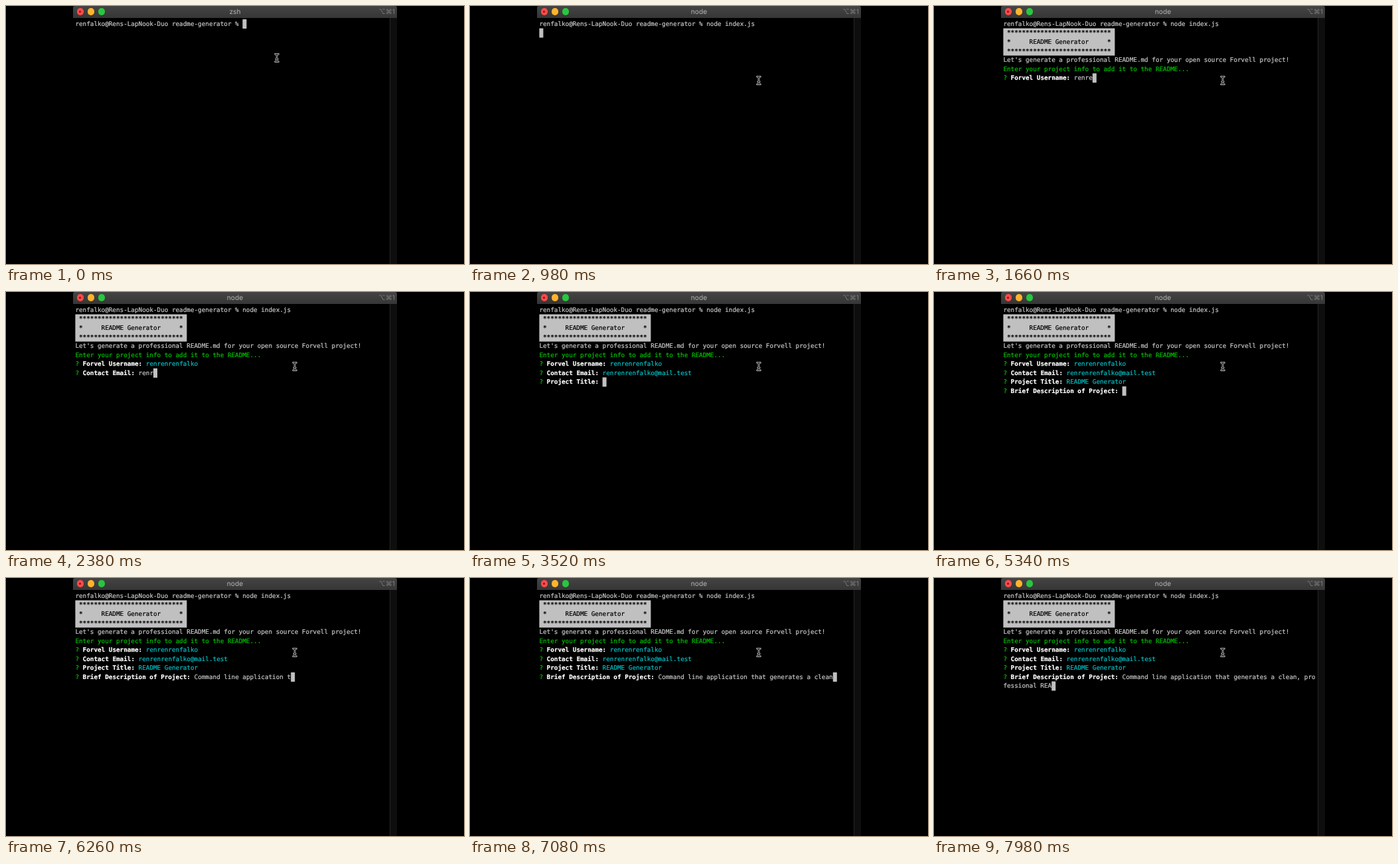
These frames come from a looping animation (690 px wide and 388 px high, 8 s). An HTML page:

```html
<!DOCTYPE html>
<html lang="en">
<head>
<meta charset="utf-8">
<title>Terminal session</title>
<style>
  html, body { margin: 0; width: 100%; height: 100%; overflow: hidden; background: #000; }
  #stage { position: relative; width: 690px; height: 388px; overflow: hidden; background: #000; text-rendering: geometricPrecision; }
  #stage > * { position: absolute; }
  #bar { left: 101px; top: 0; width: 488px; height: 17.5px; background: linear-gradient(#444, #363636); border-radius: 3px 3px 0 0; }
  #bar > * { position: absolute; }
  .light { top: 3.4px; width: 10.2px; height: 10.2px; border-radius: 50%; }
  .light i { position: absolute; left: 3.5px; top: 3.5px; width: 3.2px; height: 3.2px; border-radius: 50%; background: #7c1512; }
  #title { left: 0; width: 100%; top: 2px; text-align: center; font: 10.2px/14px Inter, sans-serif; color: #b4b4b4; }
  #keys { right: 3px; top: 2px; font: 10.2px/14px Inter, "DejaVu Sans", sans-serif; color: #7c7c7c; }
  #scroll { left: 578px; top: 17.5px; width: 10px; height: 371px; background: #0e0e0e; border-left: 1px solid #242424; }
  .row { left: 0; top: 0; height: 13.55px; white-space: pre; font: 9.3px/13.55px "DejaVu Sans Mono", monospace; color: #c7c7c7; -webkit-text-stroke: .22px currentColor; }
  .banner { color: #000; }
  .green { color: #00c200; }
  .cyan { color: #00bfc3; }
  b { color: #fff; }
  .block { left: 0; top: 0; background: #c0c0c0; }
  #panel { width: 168px; height: 40.6px; }
  #caret { width: 6px; height: 13.5px; }
  #mouse { left: 0; top: 0; overflow: visible; }
</style>
</head>
<body>
<div id="stage">
  <div id="bar">
    <div class="light" style="left:5.5px;background:#fc4b48"><i></i></div>
    <div class="light" style="left:21.5px;background:#fdb42c"></div>
    <div class="light" style="left:37.5px;background:#2bc53f"></div>
    <div id="title">zsh</div>
    <div id="keys">⌥⌘1</div>
  </div>
  <div id="scroll"></div>
  <div id="panel" class="block"></div>
  <div id="caret" class="block"></div>
  <svg id="mouse" width="1" height="1" fill="none" stroke-linecap="round">
    <defs><path id="shape" d="M-2.4-5.7Q0-5.7 0-4Q0-5.7 2.4-5.7M0-4V4M-2.4 5.7Q0 5.7 0 4Q0 5.7 2.4 5.7M-1.2 1.8H1.2"/></defs>
    <g id="beam">
      <use href="#shape" stroke="#eee" stroke-width="2.5"/>
      <use href="#shape" stroke="#000" stroke-width="1.1"/>
    </g>
  </svg>
</div>
<script>
const LOOP = 8000, COLS = 84, CELL = 5.6, LINE = 13.55, LEFT = 104.4, TOP = 20;
const TEXT_DROP = 0.9;
const $ = id => document.getElementById(id);
const stage = $('stage');

const SHELL = 'renfalko@Rens-LapNook-Duo readme-generator % ';
const COMMAND = 'node index.js';
const STARS = ' ' + '*'.repeat(28) + ' ';
const INTRO = [
  [STARS, 'banner'],
  [' *     README Generator     * ', 'banner'],
  [STARS, 'banner'],
  ["Let's generate a professional README.md for your open source Forvell project!", ''],
  ['Enter your project info to add it to the README...', 'green']
];
const INTRO_AT = 1000;

// keys: [time, characters typed]; show and done are in ms
const COMMAND_KEYS = [[260, 0], [280, 1], [800, 13]];
const QUESTIONS = [
  { label: 'Forvel Username:', answer: 'renrenrenfalko', show: 1000, done: 2140,
    keys: [[1420, 0], [1440, 1], [2060, 14]] },
  { label: 'Contact Email:', answer: 'renrenrenfalko@mail.test', show: 2160, done: 3200,
    keys: [[2280, 0], [2300, 1], [2380, 4], [3080, 23], [3120, 24]] },
  { label: 'Project Title:', answer: 'README Generator', show: 3240, done: 4360,
    keys: [[3520, 0], [3540, 1], [4240, 16]] },
  { label: 'Brief Description of Project:', show: 4400, done: Infinity,
    answer: 'Command line application that generates a clean, professional README',
    keys: [[5340, 0], [6040, 22], [6080, 23], [6260, 26], [6380, 30], [6540, 30],
           [7360, 56], [7380, 57], [7520, 61], [7840, 61], [7860, 62], [7980, 65]] }
];
const MOUSE = [[0, 408, 78], [20, 416, 88], [40, 426, 101], [60, 433, 109], [80, 435, 112]];

function place(el, row, col = 0, drop = 0) {
  el.style.transform = `translate(${LEFT + col * CELL}px, ${TOP + row * LINE + drop}px)`;
}

const rows = Array.from({ length: 11 }, (_, i) => {
  const el = document.createElement('div');
  el.className = 'row';
  place(el, i, 0, TEXT_DROP);
  return stage.insertBefore(el, $('caret'));
});
place($('panel'), 1);

function typed(keys, t) {
  if (t < keys[0][0]) return 0;
  for (let i = 1; i < keys.length; i++) {
    const [t0, n0] = keys[i - 1], [t1, n1] = keys[i];
    if (t < t1) return Math.floor(n0 + (n1 - n0) * (t - t0) / (t1 - t0) + 1e-6);
  }
  return keys[keys.length - 1][1];
}

const span = (text, style) => `<span class="${style}">${text}</span>`;

function screen(t) {
  const input = COMMAND.slice(0, typed(COMMAND_KEYS, t));
  const lines = [SHELL + input];
  let row = 0, col = lines[0].length;
  if (t >= 880) { row = 1; col = 0; }
  if (t >= INTRO_AT) {
    for (const [text, style] of INTRO) lines.push(span(text, style));
    for (const q of QUESTIONS) {
      if (t < q.show) break;
      const done = t >= q.done;
      const text = q.answer.slice(0, typed(q.keys, t));
      const start = q.label.length + 3;
      const room = COLS - start;
      row = lines.length;
      col = start + text.length;
      lines.push(`${span('?', 'green')} <b>${q.label}</b> ${span(text.slice(0, room), done ? 'cyan' : '')}`);
      if (col >= COLS) {
        lines.push(text.slice(room));
        row++;
        col -= COLS;
      }
      if (done) { row = lines.length; col = 0; }
    }
  }
  return { lines, row, col };
}

function draw(t) {
  const { lines, row, col } = screen(t);
  rows.forEach((el, i) => {
    const html = lines[i] || '';
    if (el.html !== html) el.innerHTML = el.html = html;
  });
  place($('caret'), row, col);
  $('panel').style.visibility = t < INTRO_AT ? 'hidden' : 'visible';
  $('title').textContent = t < 920 ? 'zsh' : 'node';
  const [, x, y] = MOUSE.filter(m => m[0] <= t).pop();
  $('beam').setAttribute('transform', `translate(${x} ${y})`);
}

const begin = performance.now();
function tick() {
  draw((performance.now() - begin) % LOOP);
  requestAnimationFrame(tick);
}
tick();
</script>
</body>
</html>
```
